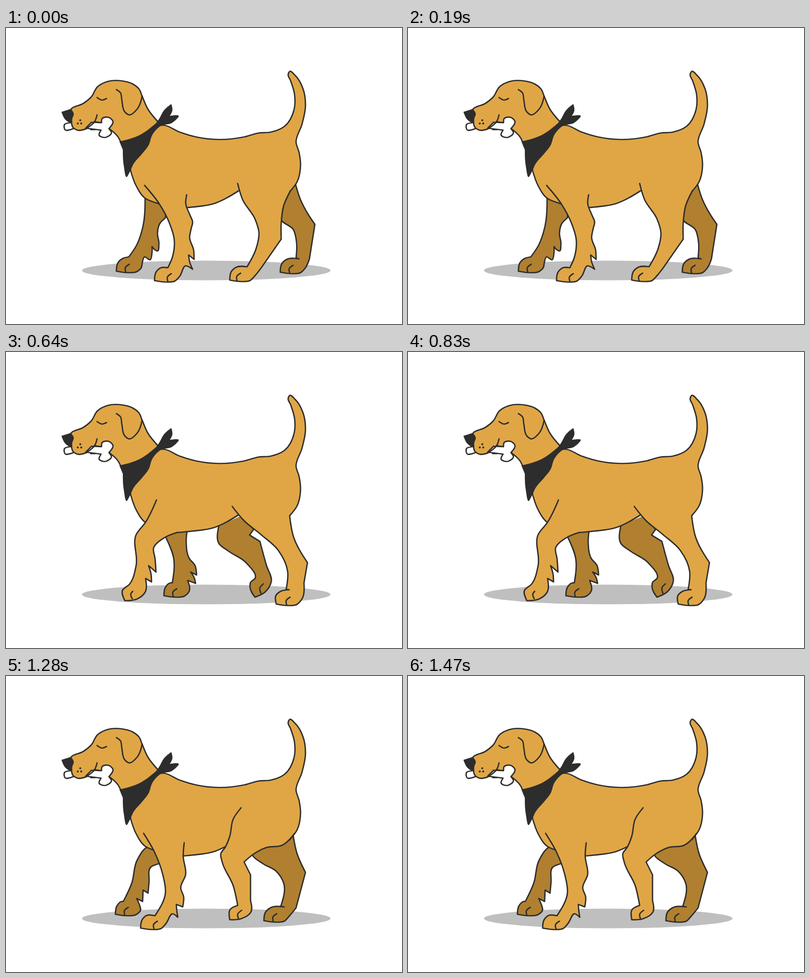
An HTML page with a canvas that plays this animation: 800 by 600 pixels, repeating every 1600 ms.

```html
<!DOCTYPE html>
<html lang="en">
<head>
<meta charset="utf-8">
<title>Walking dog</title>
<style>
html, body { margin: 0; width: 100%; height: 100%; overflow: hidden; background: #fff; }
canvas { display: block; }
</style>
</head>
<body>
<canvas id="stage" width="800" height="600"></canvas>
<script>
const ctx = document.getElementById('stage').getContext('2d');
const INK = '#2d2d2d', GOLD = '#e0a645', BROWN = '#b08030', WHITE = '#fff', GREY = '#bfbfbf';
const HOLD = 320;

// Smooth curve through the points of one run.
function curve(path, pts) {
  const last = pts.length - 1;
  if (last === 1) return path.lineTo(...pts[1]);
  const gap = i => Math.hypot(pts[i + 1][0] - pts[i][0], pts[i + 1][1] - pts[i][1]);
  const slope = i => [0, 1].map(k => {
    const a = gap(i - 1), b = gap(i);
    return ((pts[i + 1][k] - pts[i][k]) / b * a + (pts[i][k] - pts[i - 1][k]) / a * b) / (a + b);
  });
  const handle = (i, len) => slope(i).map((s, k) => pts[i][k] + s * len / 3);
  const middle = (p, q) => [(p[0] + q[0]) / 2, (p[1] + q[1]) / 2];
  for (let i = 0; i < last; i++) {
    const p = pts[i], q = pts[i + 1], len = gap(i);
    let a = i > 0 ? handle(i, len) : null;
    let b = i + 1 < last ? handle(i + 1, -len) : null;
    a = a || middle(p, b);
    b = b || middle(q, a);
    path.bezierCurveTo(...a, ...b, ...q);
  }
}

// "/" marks a corner, ";" a new line, "@x,y,toe,lean" a planted paw with its tip at x,y.
function trace(text, move = (x, y) => [x, y]) {
  const path = new Path2D();
  const full = text.replace(/@(\S+)/g, (_, paw) => {
    const [x, y, , lean = 0] = paw.split(',').map(Number);
    const at = (dx, dy) => `${x + dx},${y + dy}`;
    return [at(13 + lean, -26), at(3 + lean, -17), at(0, 0), '/',
      at(24, 3), at(41, 1), at(51, -9)].join(' ');
  });
  for (const line of full.split(';')) {
    let corner = null;
    for (const run of line.split('/')) {
      const pts = run.trim().split(/\s+/).map(p => move(...p.split(',').map(Number)));
      if (corner) pts.unshift(corner);
      else path.moveTo(...pts[0]);
      if (pts.length > 1) curve(path, pts);
      corner = pts[pts.length - 1];
    }
  }
  return path;
}

function paint(path, fill, line = INK) {
  if (fill) {
    ctx.fillStyle = fill;
    ctx.fill(path);
  }
  if (line) {
    ctx.strokeStyle = line;
    ctx.stroke(path);
  }
}

function dot(x, y, rx, ry, color) {
  ctx.fillStyle = color;
  ctx.beginPath();
  ctx.ellipse(x, y, rx, ry, 0, 0, Math.PI * 2);
  ctx.fill();
}

function leg(color, outline, toes) {
  paint(trace(outline), color);
  if (toes) paint(trace(toes));
  const paw = outline.match(/@(\S+)/);
  if (!paw) return;
  const [x, y, toe = 0] = paw[1].split(',').map(Number);
  const left = x + toe;
  paint(trace(`${left + 26},${y - 14} ${left + 18},${y - 7} ${left + 19},${y + 2}`));
}

const far = (outline, toes) => leg(BROWN, outline, toes);
const near = (outline, toes) => leg(GOLD, outline, toes);

// Raised pose: the trunk rises and the tail swings forward.
function lift(x, y) {
  if (x > 580 && y > 225 && y < 260) return [x, y];
  const swing = x > 540 && y < 235 ? (235 - y) * 0.12 : 0;
  return [x - swing, y - (y < 310 && x < 594 || y < 235 ? 7 : 4)];
}

const trunk = `470,330 420,356 366,364 345,366 / 305,355 281,345 262,318 252,290 / 245,245
  / 285,225 / 305,198 / 318,197 351,211 385,221 430,226 480,221 510,213 535,211 563,199
  582,165 583,135 575,107 570,94 573,88 585,97 600,123 605,158 598,195 586,232 592,252
  595,280 588,312 573,332`;
const body = { low: trace(trunk), high: trace(trunk, lift) };

const scarf = {};
scarf.low = trace(`229,230 270,217 304,192 / 310,183 319,167 334,154 / 336,168 331,178
  / 349,178 336,192 312,199 296,216 288,238 275,255 258,275 250,292 244,302 238,280 236,247
  / 229,230`);
scarf.high = trace(`229,222 270,209 304,188 / 308,163 322,141 / 326,151 325,160
  / 343,158 333,177 318,190 295,210 285,242 270,268 248,284 222,284
  / 224,275 233,268 238,255 236,239 / 229,222`);

const skull = trace(`234,236 225,219 211,206 / 193,192 / 179,190 / 160,205 144,207 135,201
  132,190 / 131,165 156,153 172,140 185,119 205,108.5 233,107 257,114 269,124 275,138
  287,165 307,190 / 285,222 / 245,243`);
const knob = trace('130,192 118,196 119,206 136,204');
const bone = trace(`173,191 / 193,192 / 194,184 207,181 216,189 208,204 / 213,212 200,222
  188,217 192,207 / 161,203 / 173,191`);
const nose = trace('112,170 / 131,164 / 137,174 134,184 134,194 / 121,187 112,170');
const ear = trace('223,125 231,131 234,146 240,170 248,176 266,163 275,138');
const face = trace('160,205 / 180,188 184,176 ; 184,141 194,146 203,143 ; 171,206 / 180,206');

function drawHead(y) {
  ctx.save();
  ctx.translate(0, y);
  paint(knob, WHITE);
  paint(skull, GOLD);
  paint(bone, WHITE);
  paint(nose, INK, null);
  paint(ear);
  paint(face);
  dot(150, 187, 2, 2, INK);
  dot(145, 193.5, 2, 2, INK);
  dot(152, 193.5, 2, 2, INK);
  ctx.restore();
}

function stand() {
  far(`281,342 276,405 264,440 248,464 / @223,493 275,478 280,464 291,470 295,455 295,443
    / 300,449 306,452 309,438 306,415 311,396 322,385 / 325,350`);
  far(`540,340 / 557,391 580,408 587,435 586,466 / 592,468 / @554,495 613,468
    / 624,398 / 610,377 595,348 585,317`);
  paint(body.low, GOLD);
  near(`280,319 310,357 330,395 340,430 336,465 327,486 / @300,512,8 363,482 377,489
    / 371,474 369,460 / 380,469 / 379,450 371,425 374,407 377,393 372,380 363,355 365,338`);
  near(`468,315 478,348 503,387 511,415 505,448 487,484 / @452,511,-4 515,487
    / 556,428 / 556,395 561,360 574,331`);
}

function push() {
  far(`288,343 297,380 / 296,411 293,440 282,468 / @259,493 313,462 324,468 / 325,444
    / 334,449 / 320,400`);
  far(`466,326 480,360 508,398 526,407 / 530,380 / 480,320 ; 567,364 585,371 / 598,396 614,423
    / 628,420 638,426 654,454 / 637,462 620,464 597,453 577,430`, '621,446 634,447 645,441');
  paint(body.high, GOLD);
  near(`297,303 297,370 292,400 310,422 333,443 350,471 370,480 383,496 / 400,490
    / 396,466 375,446 356,428 / 369,427 / 364,415 350,408 341,398 342,388 353,357 369,345`,
    '361,450 / 375,446 ; 381,477 389,479 396,476');
  near(`467,315 483,348 515,385 530,410 529,445 515,484 / @490,512,-3,-5 552,475
    / 578,430 / 568,380 566,350 572,328`);
}

function pass() {
  far(`315,360 / 322,374 339,420 336,468 / @319,494 367,463 / 383,469 / 380,457 373,446
    / 385,452 / 382,433 370,418 364,385 368,350`);
  far(`430,352 430,388 450,404 485,427 503,459 494,467 493,477 503,497 / 524,486 536,465
    526,432 513,384 / 492,371 / 500,360 / 480,330`, '520,470 513,478 515,489');
  paint(body.low, GOLD);
  near(`304,300 282,345 263,370 263,432 250,470 235,484 240,504 / 264,501 281,487 282,459
    / 294,466 / 293,450 288,433 / 303,446 / 301,418 298,398 319,377 345,366`,
    '256,485 252,491 255,500');
  near(`457,313 480,341 515,370 550,402 569,445 566,481 / 572,482 / @546,511,2,-4 602,468
    / 609,427 / 581,375 573,332`);
}

function kick() {
  far(`303,372 298,395 306,415 / 337,435 364,455 393,466 406,473 420,468 419,449 415,437
    400,432 375,429 / 386,422 / 370,412 349,407 / 320,390 ; 363,360 / 352,372 / 340,350`,
    '402,453 411,455 419,449');
  far(`469,325 480,359 518,392 535,420 530,468 / 523,468 / @484,495,3,3 546,473 / 562,447
    / 573,420 / 577,370 / 572,330`);
  paint(body.high, GOLD);
  near(`279,319 293,350 304,390 298,450 277,486 / @243,511,0,3 304,490 313,484 321,489
    / 322,475 324,463 / 335,468 / 339,452 337,430 349,405 352,370 358,338`);
  near(`459,289 478,325 505,365 527,395 / 565,420 605,441 620,451 628,459 641,462 656,458
    / 656,445 651,434 643,418 627,418 / 600,385 585,374 569,368 / 567,348 572,328`,
    '635,441 644,443 651,438');
}

function reach() {
  far(`315,350 / 287,346 265,373 254,420 237,457 / @221,483 270,465 264,451 / 276,457
    / 277,434 / 287,440 / 289,418 292,388 311,380`);
  far(`530,335 / 498,363 520,381 545,395 561,420 555,467 / 562,468 / @521,496 586,470
    / 605,398 / 588,360 580,322`);
  paint(body.low, GOLD);
  near(`278,319 300,357 316,400 322,440 301,486 / @272,511,8 337,482 347,489 / 345,475 344,463
    / 357,468 / 359,448 353,430 363,402 358,365 360,338`);
  near(`475,267 459,290 452,325 443,347 434,360 437,378 459,425 468,465 / 453,473 452,494
    / 475,492 495,478 494,455 / 494,403 / 481,377 / 500,361 525,348 558,343 583,319`,
    '476,475 468,483 470,493');
}

const steps = [stand, push, pass, kick, reach];

function draw(time) {
  const step = Math.floor(time / HOLD) % steps.length;
  const raised = step % 2 === 1;
  ctx.fillStyle = WHITE;
  ctx.fillRect(0, 0, 800, 600);
  ctx.lineWidth = 2.7;
  ctx.lineCap = ctx.lineJoin = 'round';
  dot(404.5, 491.5, 251, 20, GREY);
  steps[step]();
  drawHead(raised ? -7 : 0);
  paint(raised ? scarf.high : scarf.low, INK, null);
}

const start = performance.now();
function tick() {
  draw(performance.now() - start);
  requestAnimationFrame(tick);
}
tick();
</script>
</body>
</html>
```
